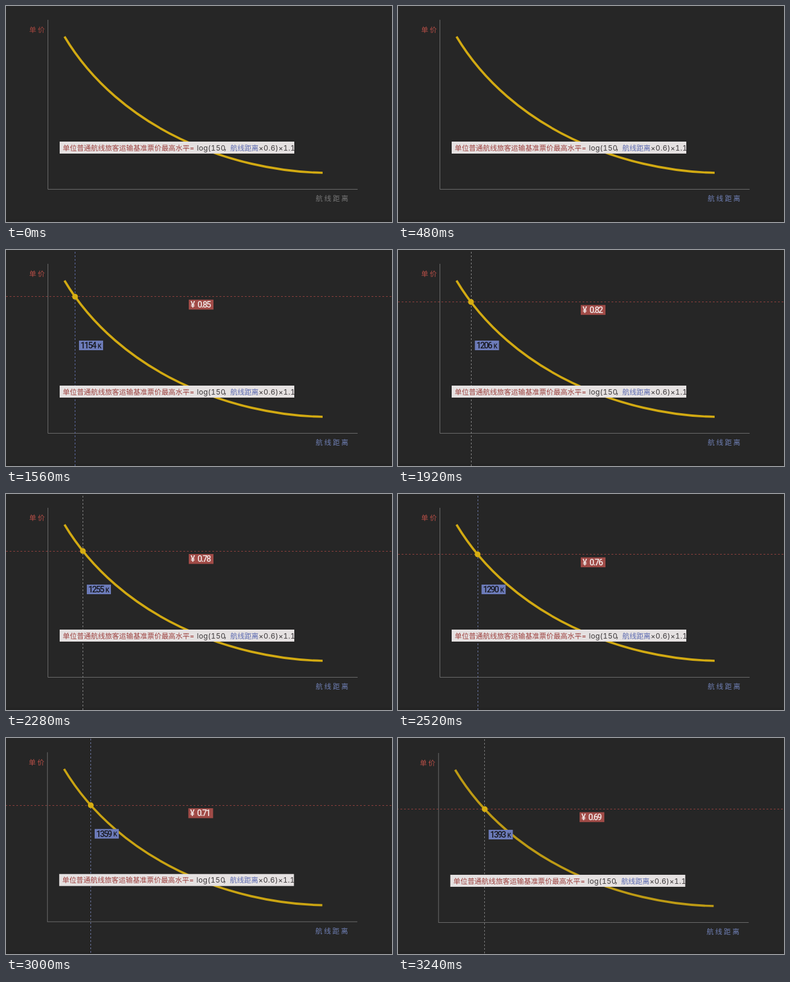
An HTML page for the animation above (3360 ms loop, 640 by 360 pixels).

```html
<!DOCTYPE html>
<html lang="zh-CN">
<head>
<meta charset="utf-8">
<title>单价与航线距离</title>
<style>
  html, body { margin: 0; width: 100%; height: 100%; overflow: hidden; background: #262626; }
  svg { display: block; width: 640px; height: 360px; }
  text { font-family: "Noto Sans CJK SC", "Noto Sans CJK", sans-serif; }
  .axis { fill: none; stroke: #6c6c6c; }
  .name { font-size: 11.5px; letter-spacing: 2.7px; }
  .formula { font-size: 11.7px; }
  .latin { font: 12px Inter, sans-serif; font-variant-numeric: tabular-nums; letter-spacing: 0.3px; }
  .value { font: 500 14px Roboto, sans-serif; letter-spacing: -1.7px; }
  .dash { stroke-width: 1; stroke-dasharray: 3 3; shape-rendering: crispEdges; }
</style>
</head>
<body>
<svg viewBox="0 0 640 360">
  <rect width="640" height="360" fill="#262626"/>
  <rect y="356" width="640" height="4" fill="#232323"/>
  <g id="scene">
    <path class="axis" d="M69.5 23V305.5H583"/>
    <text class="name" id="priceName" x="38.5" y="44.3">单价</text>
    <text class="name" id="rangeName" x="513.5" y="325.4">航线距离</text>
    <g id="guides">
      <line class="dash" id="across" x1="-12" x2="652" stroke="#8f403d"/>
      <line class="dash" id="down" y2="372"/>
    </g>
    <path id="curve" fill="none" stroke="#d2aa12" stroke-width="3.7"/>
    <circle id="dot" r="4.8" fill="#d6ad12"/>
    <g id="rangeTag">
      <rect y="-8" width="40" height="16" fill="#6c7bb9"/>
      <text class="value" id="rangeText" x="2.5" y="5.2" fill="#17181f"></text>
      <text class="value" x="31" y="4.8" style="font-size:10px" fill="#17181f">K</text>
    </g>
    <g id="priceTag">
      <rect x="-20" width="41" height="16.5" fill="#a04b47"/>
      <text class="value" x="-17" y="13.2" fill="#f2e9e8">¥</text>
      <text class="value" id="priceText" x="-5.5" y="13.2" fill="#f2e9e8"></text>
    </g>
    <g class="formula">
      <rect x="89" y="226" width="389" height="20" fill="#e5e1e1"/>
      <text x="94" y="240.7" fill="#9d403e">单位普通航线旅客运输基准票价最高水平</text>
      <text class="latin" x="304.5" y="240.7" fill="#9d403e">=</text>
      <text class="latin" x="316.5" y="240.7" fill="#3a3638">log(150</text>
      <text x="360.5" y="240.7" fill="#3a3638">，</text>
      <text x="372" y="240.7" fill="#5b69b0">航线距离</text>
      <text class="latin" x="419" y="240.7" fill="#3a3638">×0.6)×1.1</text>
    </g>
  </g>
</svg>
<script>
const LOOP = 3360, STEP = 120;
const $ = id => document.getElementById(id);
const set = (id, attrs) => {
  for (const k in attrs) $(id).setAttribute(k, attrs[k]);
};

// Cubic curve: start, two handles, end
const P = [[97, 51], [189, 205], [373, 275], [525, 278]];
set('curve', { d: `M${P[0]}C${P.slice(1).join(' ')}` });

// time, x, distance, price
const ride = [
  [1080, 106, 1086, 0.895],
  [1560, 114.5, 1154, 0.85],
  [1920, 121, 1206, 0.82],
  [2280, 127.5, 1255, 0.78],
  [2760, 136.5, 1324, 0.74],
  [3240, 146, 1393, 0.69]
];
const pop = [[960, 0], [1080, 0.1], [1200, 0.5], [1320, 0.85], [1440, 1]];
const drift = [[2880, 0], [3240, 1]];
// time, guide colour
const tints = [[0, '#5f6da6'], [1800, '#858585'], [2520, '#6b76a2'], [3120, '#7c7c7c']];

function at(table, t, col = 1) {
  if (t <= table[0][0]) return table[0][col];
  for (let i = 1; i < table.length; i++) {
    const a = table[i - 1], b = table[i];
    if (t <= b[0]) return a[col] + (b[col] - a[col]) * (t - a[0]) / (b[0] - a[0]);
  }
  return table[table.length - 1][col];
}

function bezier(u, axis) {
  const v = 1 - u, [a, b, c, d] = P.map(p => p[axis]);
  return v * v * v * a + 3 * v * v * u * b + 3 * v * u * u * c + u * u * u * d;
}

function curveY(x) {
  let lo = 0, hi = 1;
  for (let i = 0; i < 24; i++) {
    const mid = (lo + hi) / 2;
    if (bezier(mid, 0) < x) lo = mid; else hi = mid;
  }
  return bezier(lo, 1);
}

function draw(t) {
  const x = at(ride, t), y = curveY(x);
  const s = at(pop, t), d = at(drift, t);

  set('scene', { transform: `translate(${-2.4 * d} ${2 * d}) scale(${1 + 0.0015 * d} 1)` });
  set('priceName', { fill: t < 120 ? '#a8473f' : '#b84f47' });
  set('rangeName', { fill: t < 120 ? '#777777' : '#6f7fb4' });
  set('curve', { opacity: 1 - 0.12 * d });

  set('guides', { visibility: t < 1200 ? 'hidden' : 'visible' });
  set('across', { y1: y, y2: y });
  set('down', {
    x1: x, x2: x, y1: d > 0 ? -12 : 3,
    stroke: tints.filter(r => r[0] <= t).pop()[1]
  });
  set('dot', { transform: `translate(${x} ${y}) scale(${s})` });
  set('rangeTag', { transform: `translate(${x + 6.5} 159) scale(${s})` });
  set('priceTag', { transform: `translate(323 ${y + 5}) scale(${s})` });
  $('rangeText').textContent = Math.round(at(ride, t, 2));
  $('priceText').textContent = at(ride, t, 3).toFixed(2);
}

function tick() {
  draw(Math.floor(performance.now() / STEP) * STEP % LOOP);
  requestAnimationFrame(tick);
}
tick();
</script>
</body>
</html>
```
